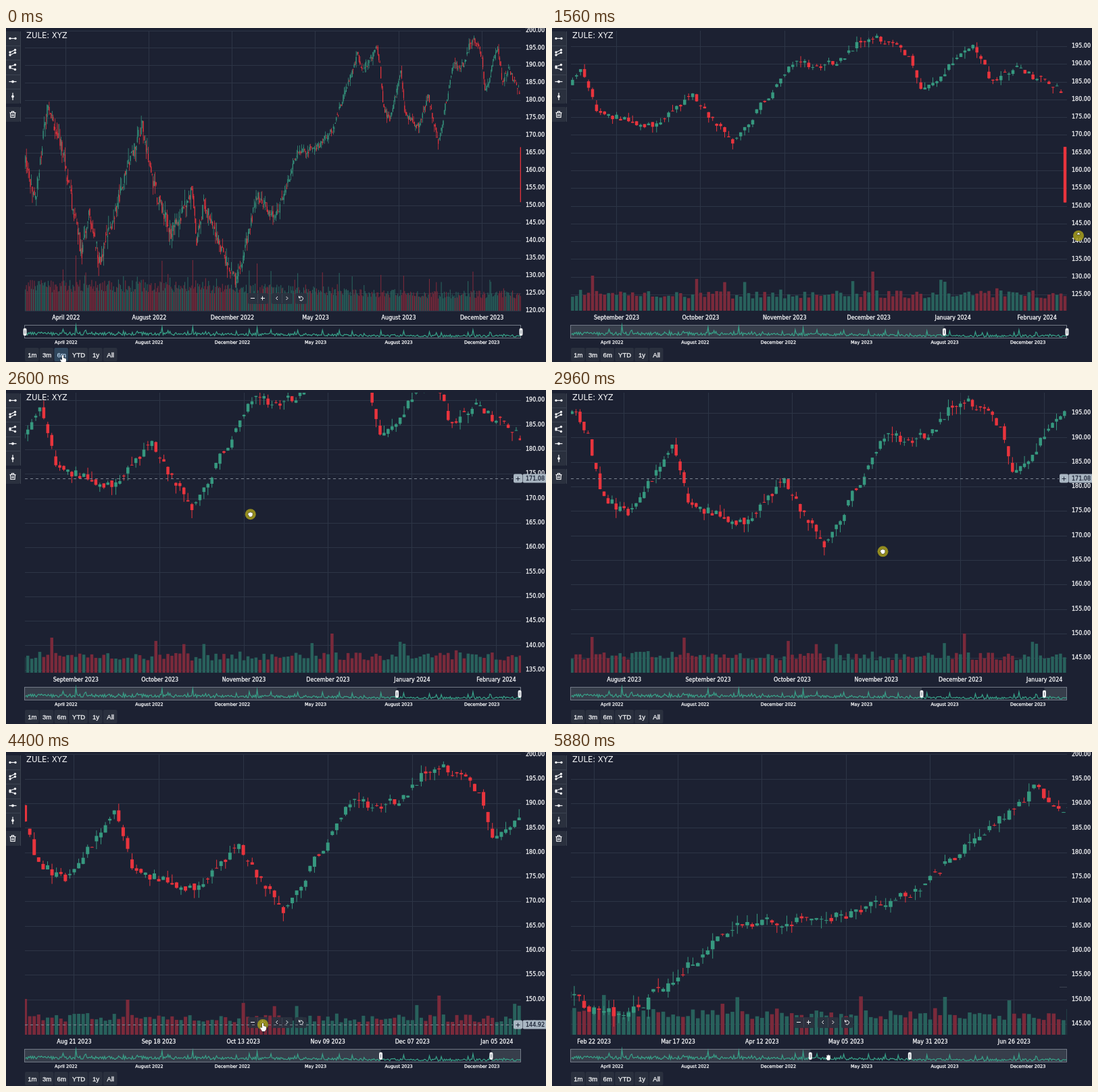
An HTML page with a canvas for the animation above (5.92 s loop, 799 by 495 pixels).

```html
<!DOCTYPE html>
<html lang="en">
<head>
<meta charset="utf-8">
<title>Stock chart</title>
<style>
html, body { margin: 0; width: 100%; height: 100%; overflow: hidden; background: #1c2132; }
canvas { display: block; }
</style>
</head>
<body>
<canvas id="stage" width="799" height="495"></canvas>
<script>
const ctx = document.getElementById('stage').getContext('2d');
const LOOP = 5920, DAYS = 501;
const L = 28, R = 762, T = 4, B = 419, W = R - L, MID = (T + B) / 2;
const NAV_T = 440, NAV_B = 460;
const SANS = '"DejaVu Sans", sans-serif', UI = '"Liberation Sans", sans-serif';
const C = {
  bg: '#1c2132', grid: '#2d3546', text: '#f4f5f7', panel: '#2a303e', edge: '#3c4351',
  up: '#36987f', down: '#e8343d', upVol: '#28615c', downVol: '#7a2a3b',
  mask: '#373e4b', frame: '#727986', tag: '#a9b6c2', press: '#a39a1c'
};

const clamp = (v, a = 0, b = 1) => Math.min(b, Math.max(a, v));
const mix = (a, b, u) => a + (b - a) * u;
const span = (t, a, b) => clamp((t - a) / (b - a));
const smooth = u => u * u * (3 - 2 * u);
const cubic = u => u < .5 ? 4 * u ** 3 : 1 - 4 * (1 - u) ** 3;

let seed = 4127;
function rnd() {
  seed = (seed + 0x6d2b79f5) | 0;
  let n = Math.imul(seed ^ seed >>> 15, 1 | seed);
  n = n + Math.imul(n ^ n >>> 7, 61 | n) ^ n;
  return ((n ^ n >>> 14) >>> 0) / 4294967296;
}
const jitter = size => (rnd() - .5) * size;

// Main swings of the price: day, price
const SWINGS = [
  [0, 163], [10, 152], [22, 178], [36, 168], [57, 136], [64, 149], [75, 134], [106, 163],
  [118, 173], [128, 157], [147, 142], [168, 154], [173, 140], [180, 151], [213, 127],
  [234, 153], [252, 146], [275, 165], [296, 167], [311, 172], [335, 193], [341, 189],
  [355, 195], [358, 191], [361, 179], [368, 174], [379, 189], [383, 177], [397, 172],
  [407, 181], [417, 168], [432, 190], [442, 190], [451, 198], [461, 193], [464, 182],
  [477, 195], [482, 185], [488, 189], [500, 182]
];
const PEAKS = { 51: 82, 138: 74, 169: 75, 234: 70, 317: 56, 359: 53, 382: 52, 452: 58 };

function trend(i) {
  const k = clamp(SWINGS.findIndex(s => s[0] > i), 1, SWINGS.length - 1);
  const [a, b] = [SWINGS[k - 1], SWINGS[k]];
  return mix(a[1], b[1], span(i, a[0], b[0]));
}

const bars = [];
for (let i = 0, prev = 162; i < DAYS; i++) {
  const wild = mix(3.6, 1.8, span(i, 150, 300));
  const close = Math.min(199, trend(i) + jitter(wild * 1.2));
  const open = mix(prev, close, rnd() * .7) + jitter(wild * .6);
  const base = mix(38, 25, span(i, 130, 400));
  const burst = rnd() < .06 ? 1.2 + rnd() * .6 : 1;
  bars.push({
    open, close, up: close >= open,
    high: Math.min(199.6, Math.max(open, close) + rnd() ** 2 * wild),
    low: Math.min(open, close) - rnd() ** 2 * wild,
    vol: PEAKS[i] || base * burst * (.72 + .5 * rnd())
  });
  prev = close;
}

// Exchange holidays of the calendar, by rule
function isHoliday(d) {
  const m = d.getUTCMonth() + 1, n = d.getUTCDate(), wd = d.getUTCDay();
  const fixed = day => ['1/1', '6/19', '7/4', '12/25'].includes(`${m}/${day}`);
  if (fixed(n) || wd === 1 && fixed(n - 1)) return true;
  if (wd === 1) return m < 3 && n > 14 && n < 22 || m === 5 && n > 24 || m === 9 && n < 8;
  return wd === 4 && m === 11 && n > 21 && n < 29 || wd === 5 && m === 4 && (n === 7 || n === 15);
}
const dates = [];
for (let ms = Date.UTC(2022, 2, 1); dates.length < DAYS; ms += 864e5) {
  const d = new Date(ms);
  if (d.getUTCDay() % 6 && !isHoliday(d)) dates.push(d);
}
function dateText(i, long) {
  const d = dates[i], y = d.getUTCFullYear();
  const m = d.toLocaleString('en-US', { month: 'long', timeZone: 'UTC' });
  return long ? `${m} ${y}` : `${m.slice(0, 3)} ${String(d.getUTCDate()).padStart(2, '0')} ${y}`;
}

// Visible days, vertical zoom and centre price at a time
function viewAt(t) {
  const half = 377.1, count = DAYS - half;
  const pan = span(t, 2520, 3160);
  const px = 176 * smooth(pan), py = 83 * (1 - (1 - pan) ** 2.3);
  const shift = px * count / W;
  let start = half * smooth(span(t, 260, 440)) - shift, end = DAYS - shift;
  for (const z of [3880, 4400]) {
    const cut = (end - start) * .1 * smooth(span(t, z, z + 120));
    start += cut * .97;
    end -= cut * .03;
  }
  const slide = 128.4 * smooth(span(t, 5056, 5600));
  const k0 = (B - T) / 80, zoom = 1.4;
  return {
    start: start - slide, end: end - slide, px, py,
    k: k0 * mix(1, zoom, cubic(span(t, 1510, 1760))), mid: 160 + py / (k0 * zoom)
  };
}

// Pointer stops: time, x, y, ease of the way there
const linear = u => u;
const PATH = [
  [600, 84, 487], [1160, 779, 321], [1510, 779, 321], [1760, 779, 200], [2360, 354, 131],
  [2520, 354, 162], [3160, 530, 245], [3200, 530, 245], [3400, 374, 371, linear],
  [3600, 380, 404], [4720, 380, 404], [5060, 585, 450], [5600, 396, 450], [5800, 396, 450],
  [5840, 409, 452]
];
const panning = t => t >= 2520 && t < 3160;
function cursorAt(t) {
  if (panning(t)) {
    const v = viewAt(t);
    return { x: 354 + v.px, y: 162 + v.py };
  }
  const next = PATH.findIndex(p => p[0] > t);
  const k = next < 0 ? PATH.length - 1 : Math.max(1, next);
  const a = PATH[k - 1], b = PATH[k], u = (b[3] || smooth)(span(t, a[0], b[0]));
  return { x: mix(a[1], b[1], u), y: mix(a[2], b[2], u) };
}
const PRESSES = [[280, 360], [1510, 1760], [2520, 3160], [3860, 3960], [4380, 4480], [5056, 5600]];

function box(x, y, w, h, fill) {
  ctx.fillStyle = fill;
  ctx.fillRect(x, y, w, h);
}
function panel(x, y, w, h, fill = C.panel) {
  ctx.beginPath();
  ctx.roundRect(x, y, w, h, 2);
  ctx.fillStyle = fill;
  ctx.fill();
}
function line(color, width, ...pts) {
  ctx.beginPath();
  for (let i = 0; i < pts.length; i += 2) ctx.lineTo(pts[i], pts[i + 1]);
  ctx.strokeStyle = color;
  ctx.lineWidth = width;
  ctx.stroke();
}
function dot(x, y, r, fill = C.text) {
  ctx.beginPath();
  ctx.arc(x, y, r, 0, 7);
  ctx.fillStyle = fill;
  ctx.fill();
}
function label(s, x, y, size, align = 'center', font = SANS, color = C.text) {
  ctx.font = `${size}px ${font}`;
  ctx.textAlign = align;
  ctx.textBaseline = 'middle';
  ctx.fillStyle = ctx.strokeStyle = color;
  ctx.fillText(s, x, y);
  // Small sizes get a little extra weight
  if (size < 10) {
    ctx.lineWidth = .3;
    ctx.strokeText(s, x, y);
  }
}
const crisp = v => Math.floor(v) + .5;

function drawChart(v) {
  const w = W / (v.end - v.start), bw = Math.max(1, w * .76);
  const px = i => L + (i + .5 - v.start) * w;
  const py = p => MID - (p - v.mid) * v.k;

  for (let p = 100; p <= 220; p += 5) {
    const y = py(p);
    if (y < 3 || y > 420) continue;
    line(C.grid, 1, L, crisp(y), R, crisp(y));
    label(p.toFixed(2), 769, y - .5, 8, 'left');
  }
  const step = Math.ceil((v.end - v.start) / 6 - .01);
  for (let i = (step - 1) >> 1; i < DAYS; i += step) {
    const x = px(i);
    if (x < L || x > R) continue;
    line(C.grid, 1, crisp(x), T, crisp(x), B);
    label(dateText(i, step > 20), x, 430, 8);
  }

  ctx.save();
  ctx.beginPath();
  ctx.rect(L, T, W, B - T);
  ctx.clip();
  const last = Math.min(DAYS - 1, Math.ceil(v.end));
  for (let i = Math.max(0, Math.floor(v.start) - 1); i <= last; i++) {
    const b = bars[i], x = px(i), color = b.up ? C.up : C.down;
    box(x - bw / 2, B - b.vol, bw, b.vol, b.up ? C.upVol : C.downVol);
    const wick = Math.min(1, w * .5);
    box(x - wick / 2, py(b.high), wick, (b.high - b.low) * v.k, color);
    box(x - bw / 2, py(Math.max(b.open, b.close)), bw, Math.max(1, Math.abs(b.open - b.close) * v.k), color);
  }
  ctx.restore();
}

function drawNavigator(v) {
  const w = W / DAYS, a = L + v.start * w, b = L + v.end * w;
  box(L, NAV_T, a - L, NAV_B - NAV_T, C.mask);
  box(b, NAV_T, R - b, NAV_B - NAV_T, C.mask);
  ctx.strokeStyle = C.frame;
  ctx.lineWidth = 1;
  ctx.strokeRect(L - .5, NAV_T + .5, W, NAV_B - NAV_T - 1);
  const pts = bars.flatMap((bar, i) => [L + (i + .5) * w, 459 - (bar.vol - 14) / 68 * 18]);
  line('#37a188', 1.2, ...pts);
  for (const x of [a, b]) {
    panel(x - 2.5, 445, 5, 11, '#eef0f2');
    line('#7b828c', 1, x, 448, x, 453);
  }
  for (let i = 41; i < DAYS; i += 84) label(dateText(i, true), L + (i + .5) * w, 466.5, 6.5);
}

function drawTools() {
  panel(-2, 5, 23, 107);
  panel(-2, 117, 23, 22);
  for (let i = 1; i < 5; i++) line(C.edge, 1, 0, crisp(5 + i * 21.4), 21, crisp(5 + i * 21.4));
  line(C.edge, 1, 21.5, 5, 21.5, 112);
  line(C.edge, 1, 21.5, 117, 21.5, 139);
  const ink = (...pts) => line(C.text, 1.2, ...pts);
  const seg = (x1, y1, x2, y2) => {
    ink(x1, y1, x2, y2);
    dot(x1, y1, 1.7);
    dot(x2, y2, 1.7);
  };
  seg(6, 15.5, 14, 15.5);
  seg(6, 36, 13.5, 32.5);
  seg(6, 40, 13.5, 36.5);
  seg(6, 57, 13.5, 54.5);
  seg(6, 59, 13.5, 61.5);
  ink(4.5, 79.5, 15.5, 79.5);
  dot(10, 79.5, 1.9);
  ink(10, 96, 10, 107);
  dot(10, 101.5, 1.9);
  ink(5.5, 125.5, 14.5, 125.5);
  ink(8.5, 125, 8.5, 123.5, 11.5, 123.5, 11.5, 125);
  ink(6.5, 126, 7, 132.5, 13, 132.5, 13.5, 126);
  ink(9, 127.5, 9, 131);
  ink(11, 127.5, 11, 131);
}

function drawPeriods(t) {
  let x = 28;
  ['1m', '3m', '6m', 'YTD', '1y', 'All'].forEach((s, i) => {
    const w = s === 'YTD' ? 29 : 21.7, hot = i === 2 && t < 640;
    panel(x, 474, w - 1, 20, hot ? '#30475e' : C.panel);
    label(s, x + w / 2, 485, 9.6, 'center', UI, hot ? '#b9d4ec' : C.text);
    x += w;
  });
}

function drawControls(t) {
  if (t > 760 && t < 3560) return;
  ctx.globalAlpha = .93;
  panel(358, 393, 30, 16);
  panel(393, 393, 31, 16);
  panel(428, 393, 17, 16);
  ctx.globalAlpha = 1;
  line(C.edge, 1, 372.5, 394, 372.5, 408);
  line(C.edge, 1, 408.5, 394, 408.5, 408);
  const ink = (...pts) => line(C.text, 1, ...pts);
  ink(362, 400.5, 368, 400.5);
  ink(377, 400.5, 383, 400.5);
  ink(379.5, 397.5, 379.5, 403.5);
  ink(402, 398, 399.5, 400.5, 402, 403);
  ink(414.5, 398, 417, 400.5, 414.5, 403);
  ctx.beginPath();
  ctx.arc(436.5, 401, 3, -2.6, 2.3);
  ctx.stroke();
  ink(433.5, 397, 433.5, 400, 436, 400);
}

// The line and its tag trail the pointer a little and rest while the chart is dragged
function drawCrosshair(t, v) {
  const frozen = t >= 2360 && t < 3160;
  const tag = frozen ? 131 : cursorAt(t - 25).y, y = frozen ? 131 : cursorAt(t - 73).y;
  if (t < 640 || t > 5000 || cursorAt(t).x > R || tag > B) return;
  ctx.setLineDash([4, 4]);
  line('#7d8592', 1, L, crisp(y), 750, crisp(y));
  ctx.setLineDash([]);
  panel(751, tag - 6.5, 13, 13, C.tag);
  panel(764.5, tag - 6.5, 36, 13, C.tag);
  const ink = '#20283a', mid = frozen ? 160 : v.mid;
  line(ink, 1, 754.5, crisp(tag), 760.5, crisp(tag));
  line(ink, 1, 757.5, tag - 2.5, 757.5, tag + 3.5);
  label((mid + (MID - tag) / v.k).toFixed(2), 769, tag + .5, 8, 'left', SANS, ink);
}

function shape(x, y, ...pts) {
  ctx.beginPath();
  for (let i = 0; i < pts.length; i += 2) ctx.lineTo(x + pts[i], y + pts[i + 1]);
  ctx.closePath();
  ctx.fillStyle = '#fff';
  ctx.strokeStyle = '#10131c';
  ctx.lineWidth = .8;
  ctx.stroke();
  ctx.fill();
}

function drawCursor(t) {
  const { x, y } = cursorAt(t);
  if (PRESSES.some(([a, b]) => t >= a && t < b)) {
    ctx.globalAlpha = .88;
    dot(x, y, 8, C.press);
    ctx.globalAlpha = 1;
  }
  if (t < 640 || (t > 3480 && t < 4760)) {
    shape(x, y, -1, -2, 1, -2, 1, 2, 5, 3, 5, 7, 3, 10, -1, 10, -4, 5, -3, 4, -1, 5);
  } else if (x > R) {
    shape(x, y, 0, -5, 2.5, -2, -2.5, -2);
  } else if (panning(t)) {
    shape(x, y, -3, -2, 0, -3, 3, -2, 3, 1, 1.5, 3.5, -1.5, 3.5, -3.5, 0);
  } else if (t > 5000) {
    shape(x, y, -2.5, -3, -1, -2, 0, -4, 1, -2, 2.5, -3, 3, 2, 1.5, 5, -1.5, 5, -4, 1, -2.5, 1);
  } else {
    shape(x, y, 0, -2, 0, 7, 2, 5.5, 3.5, 8.5, 4.8, 8, 3.5, 5, 6, 5);
  }
}

function draw(now) {
  const t = now % LOOP, v = viewAt(t);
  box(0, 0, 799, 495, C.bg);
  drawChart(v);
  drawNavigator(v);
  drawTools();
  drawPeriods(t);
  label('ZULE: XYZ', 30, 11.5, 11.6, 'left');
  drawControls(t);
  drawCrosshair(t, v);
  if (t > 5000) line(C.edge, 1, 751, 348.5, R, 348.5);
  drawCursor(t);
}

const begin = performance.now();
function tick() {
  draw(performance.now() - begin);
  requestAnimationFrame(tick);
}
tick();
</script>
</body>
</html>
```
